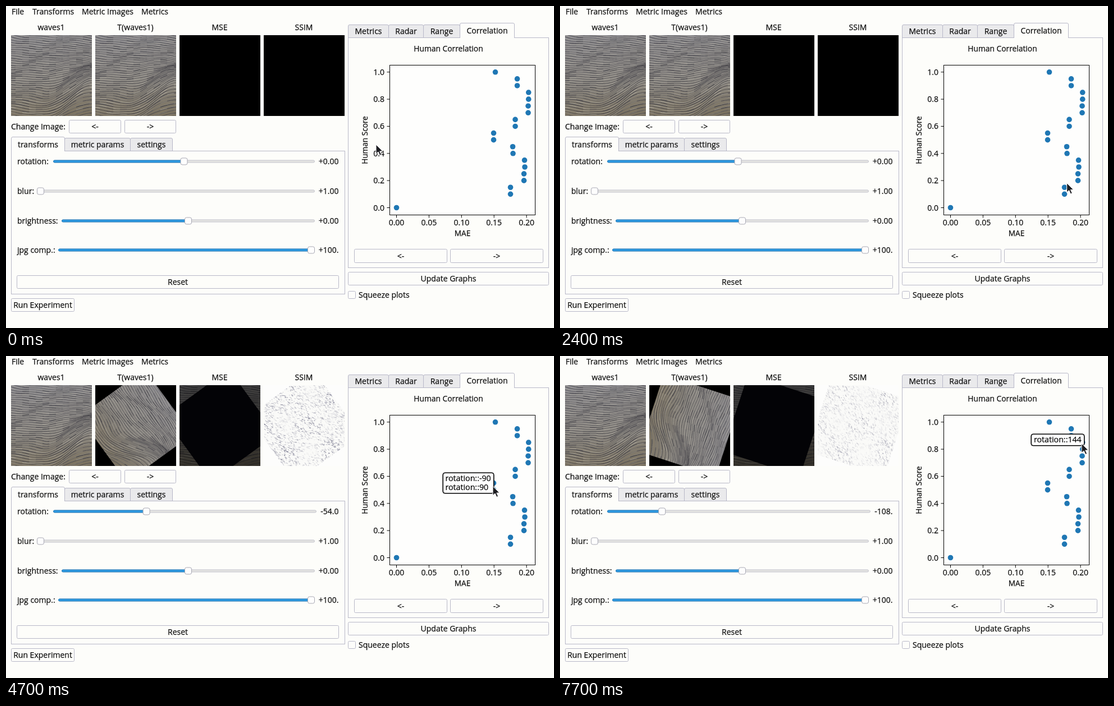
An HTML page with a canvas that plays this animation: 976 by 574 pixels, repeating every 8000 ms.

```html
<!DOCTYPE html>
<html lang="en">
<head>
<meta charset="utf-8">
<title>Image metric explorer</title>
<style>
  html, body { margin: 0; width: 100%; height: 100%; overflow: hidden; background: #fdfdfa; }
  body { position: relative; font: 14px "Open Sans", "Noto Sans", sans-serif; color: #111; }
  svg, canvas, #tip { position: absolute; }
  #ui { left: 0; top: 0; }
  #ui text { fill: #111; stroke: #111; stroke-width: .25px; }
  canvas { left: 9px; top: 52px; }
  #tip {
    box-sizing: border-box; padding: 1px 4px 2px; white-space: pre; font-size: 14.2px; line-height: 16px;
    border: 1px solid #000; border-radius: 4px; box-shadow: 0 0 0 .6px #000; background: #fff;
    color: #000; -webkit-text-stroke: .2px #000;
  }
  #cursor { left: 0; top: 0; overflow: visible; }
</style>
</head>
<body>
<svg id="ui" width="976" height="574"></svg>
<canvas id="views" width="594" height="144"></canvas>
<div id="tip"></div>
<svg id="cursor" width="14" height="21">
  <path d="M0 0V16.5L4 13L6.8 19.4L9.6 18.2L6.8 12H12Z" fill="#1e1e22" stroke="#fff" stroke-width="1"/>
</svg>
<script>
const $ = id => document.getElementById(id);
const ui = $('ui'), tip = $('tip'), cursor = $('cursor');
const BORDER = '#b8b8c8', PAPER = '#fdfdfa', BLUE = '#1f77b4';

function el(tag, attrs, text) {
  const node = document.createElementNS('http://www.w3.org/2000/svg', tag);
  for (const k in attrs) node.setAttribute(k, attrs[k]);
  if (text !== undefined) node.textContent = text;
  return ui.appendChild(node);
}
const label = (x, y, text, anchor = 'start', size = 14) =>
  el('text', { x, y, 'text-anchor': anchor, 'font-size': size }, text);
const mid = (x, y, text, size) => label(x, y, text, 'middle', size);
const box = (x, y, width, height, rx = 2, fill = PAPER, stroke = BORDER) =>
  el('rect', { x: x + .5, y: y + .5, width, height, rx, fill, stroke });
const line = (x1, y1, x2, y2) => el('line', { x1, y1, x2, y2, stroke: '#000' });

function button(x, y, w, h, text) {
  box(x, y, w, h);
  mid(x + w / 2 + .5, y + h / 2 + 5.5, text);
}
function tab(x, y, w, bottom, text, active) {
  const end = bottom + (active ? 1 : 0);
  el('path', {
    d: `M${x + .5} ${end}V${y + 3}q0 -2.5 2.5 -2.5h${w - 5}q2.5 0 2.5 2.5V${end}`,
    fill: active ? PAPER : '#eaeaec', stroke: BORDER
  });
  mid(x + w / 2 + .5, active ? y + 18.5 : y + 17, text);
}
function slider(name, x, y) {
  label(20, y + 5, name);
  const rail = box(x, y - 2.5, 10, 4, 2, '#e4e4e2', '#c3c3cc');
  const fill = box(x, y - 2.5, 10, 4, 2, '#2f9be2', '#1f78b8');
  const knob = box(0, y - 6.5, 12, 12, 3, '#fdfdfd', '#a9a9b4');
  const value = label(592.5, y + 5, '', 'end');
  return (part, end, text) => {
    const at = x + 6.5 + (end - x - 13) * part;
    rail.setAttribute('width', end - x - 1);
    fill.setAttribute('width', Math.max(0, at - x - 4));
    fill.setAttribute('visibility', part ? 'visible' : 'hidden');
    knob.setAttribute('x', at - 6);
    value.textContent = text;
  };
}

// Menu, image titles, left side
[[10, 'File'], [47, 'Transforms'], [135, 'Metric Images'], [241, 'Metrics']].forEach(([x, s]) => label(x, 15, s));
['waves1', 'T(waves1)', 'MSE', 'SSIM'].forEach((s, i) => mid(80.5 + 150 * i, 43, s));
label(9, 219.5, 'Change Image:');
button(112, 203, 92, 23, '<-');
button(211, 203, 91, 23, '->');
box(9, 258, 594, 255, 0);
tab(104, 235, 117, 258, 'metric params');
tab(221, 235, 75, 258, 'settings');
tab(9, 233, 95, 258, 'transforms', true);
const setRotation = slider('rotation:', 84, 277);
slider('blur:', 55, 330)(0, 550, '+1.00');
slider('brightness:', 99, 383)(.5, 550, '+0.00');
slider('jpg comp.:', 93, 435)(1, 550, '+100.');
button(19, 480, 573, 23, 'Reset');
button(9, 521, 112, 23, 'Run Experiment');

// Right side
box(609, 56, 357, 410, 0);
tab(609, 33, 72, 56, 'Metrics');
tab(681, 33, 62, 56, 'Radar');
tab(743, 33, 65, 56, 'Range');
tab(808, 30, 97, 56, 'Correlation', true);
button(620, 433, 165, 24, '<-');
button(791, 433, 165, 24, '->');
button(609, 474, 357, 23, 'Update Graphs');
box(609, 508, 13, 13);
label(628, 520, 'Squeeze plots');

// Scatter plot
const scoreY = s => 359.5 - 241.7 * s;
mid(788, 81, 'Human Correlation', 13.8);
box(683, 105, 259, 267, 0, '#fefefd', '#000');
for (let i = 0; i < 5; i++) {
  const x = 695.5 + 57.9 * i;
  line(x, 372.5, x, 377.5);
  mid(x, 391, (i * .05).toFixed(2));
}
for (let i = 0; i < 6; i++) {
  const y = scoreY(i / 5);
  line(678.5, y, 683.5, y);
  label(674, y + 5, (i / 5).toFixed(1), 'end');
}
mid(813, 410, 'MAE', 13.6);
mid(0, 0, 'Human Score', 13.6).setAttribute('transform', 'translate(644 239) rotate(-90)');
const dots = [[695.5, 0], [871.5, 1]];
[898.5, 922.5, 924, 903, 868.5, 907, 930, 930.7, 910.5].forEach((x, i) => {
  dots.push([x, .1 * (i + 1)], [x - (i % 4 > 1 && i < 4 ? .5 : 0), .1 * (i + 1) + .05]);
});
dots.forEach(([x, s]) => el('circle', { cx: x, cy: scoreY(s), r: 4.8, fill: BLUE }));

// Image views
const SIZE = 144;
const ctx = $('views').getContext('2d');

function random(seed) {
  return () => (seed = (seed * 16807) % 2147483647) / 2147483647;
}
function rippleY(c, x) {
  const u = x / SIZE, v = c / SIZE;
  const k = Math.min(1, Math.max(0, (u - .4) / .6));
  return c + 14 * u * (1 - v) + 1.2 * Math.sin(u * 14 + v * 19) + 3 * Math.sin(u * 5 + v * 6)
    - 42 * k * k * (3 - 2 * k) * Math.exp(-(((v - .78) / .4) ** 2));
}
function makeWaves() {
  const c = document.createElement('canvas');
  c.width = c.height = SIZE;
  const g = c.getContext('2d');
  const rnd = random(97);
  const shade = g.createLinearGradient(50, 0, 60, SIZE);
  shade.addColorStop(0, '#8d8c90');
  shade.addColorStop(.6, '#89857f');
  shade.addColorStop(1, '#7c7361');
  g.fillStyle = shade;
  g.fillRect(0, 0, SIZE, SIZE);
  // Uneven ripples, drawn in short pieces of changing weight
  const ripples = (shift, color, width) => {
    for (let y = -40; y < 210; y += 3.4 + rnd() * 1.2) {
      for (let x = -4; x < SIZE; x += 12) {
        g.strokeStyle = `rgba(${color},${.3 + rnd() * .5})`;
        g.lineWidth = width * (.7 + rnd() * .6);
        g.beginPath();
        for (let dx = 0; dx <= 12; dx += 3) g.lineTo(x + dx, rippleY(y, x + dx) + shift);
        g.stroke();
      }
    }
  };
  ripples(1.8, '180,176,166', 1.1);
  ripples(0, '58,57,64', 1.4);
  return c;
}
const waves = makeWaves();

// Runs paint() in view i, clipped to it, with the middle as zero
function view(i, paint) {
  ctx.save();
  ctx.beginPath();
  ctx.rect(150 * i, 0, SIZE, SIZE);
  ctx.clip();
  ctx.translate(150 * i + SIZE / 2, SIZE / 2);
  paint();
  ctx.restore();
}
const H = SIZE / 2;
const fillSquare = color => { ctx.fillStyle = color; ctx.fillRect(-H, -H, SIZE, SIZE); };
const drawWaves = () => ctx.drawImage(waves, -H, -H);

function speckle(angle, strength) {
  const rnd = random(4711);
  for (let i = 0; i < 2200; i++) {
    const x = (rnd() - .5) * SIZE, y = (rnd() - .5) * SIZE;
    const a = angle * .5 + (rnd() - .5) * 1.2, len = 1 + rnd() * 4;
    const patch = .6 + .4 * Math.sin(x / 13 + 1) * Math.sin(y / 17 + 2);
    ctx.lineWidth = .7 + rnd() * .5;
    ctx.strokeStyle = `rgba(105,105,130,${strength * patch * rnd()})`;
    ctx.beginPath();
    ctx.moveTo(x, y);
    ctx.lineTo(x + len * Math.cos(a), y + len * Math.sin(a));
    ctx.stroke();
  }
}
const speckleStrength = { '-54': .95, '-90': .35, '-108': .55 };

function drawViews(deg) {
  const angle = -deg * Math.PI / 180;
  ctx.clearRect(0, 0, 594, SIZE);
  view(0, drawWaves);
  view(1, () => { fillSquare('#000'); ctx.rotate(angle); drawWaves(); });
  view(2, () => {
    if (!deg) return fillSquare('#000');
    drawWaves();
    fillSquare('rgba(0,0,0,.58)');
    ctx.rotate(angle);
    fillSquare('#030306');
  });
  view(3, () => {
    if (!deg) return fillSquare('#000');
    fillSquare('#fdfdfc');
    ctx.rotate(angle);
    ctx.beginPath();
    ctx.rect(-H, -H, SIZE, SIZE);
    ctx.clip();
    ctx.rotate(-angle);
    fillSquare('#fafaf8');
    speckle(angle, speckleStrength[deg]);
  });
}

// Timeline
const LOOP = 8000, STEP = 100;
const path = [
  [0, 659, 247], [900, 729, 350], [1100, 795, 357], [1400, 889, 340], [1600, 894, 336],
  [1700, 894, 336], [2000, 895, 328], [2200, 895, 328], [2700, 914, 297], [3100, 922, 281],
  [3900, 922, 281], [4700, 867, 232], [5500, 867, 232], [5800, 903, 211], [6900, 903, 211],
  [7000, 904, 211], [7700, 929, 156], [8000, 929, 156]
];
const turns = [[0, 0, '+0.00'], [3600, -54, '-54.0'], [5400, -90, '-90.0'], [6400, -108, '-108.']];
const tips = [
  [1800, 2300, 898.5, .1, [-18, 18]], [2800, 4000, 924, .3, [-54, 54]], [4100, 4400, 903, .4, [-72, 72]],
  [4600, 5600, 868.5, .5, [-90, 90]], [5700, 7100, 907, .6, [-108]], [7500, LOOP, 930, .85, [144]]
];

function placeCursor(t) {
  const i = path.findIndex(p => p[0] > t);
  const [t0, x0, y0] = path[i - 1], [t1, x1, y1] = path[i];
  const k = (t - t0) / (t1 - t0);
  cursor.style.transform = `translate(${x0 + (x1 - x0) * k}px, ${y0 + (y1 - y0) * k}px)`;
}
function placeTip(t) {
  const now = tips.find(p => t >= p[0] && t < p[1]);
  tip.style.display = now ? 'block' : 'none';
  if (!now) return;
  const [, , x, score, values] = now;
  tip.textContent = values.map(v => 'rotation::' + v).join('\n');
  tip.style.left = x - 91 + 'px';
  tip.style.top = scoreY(score) + 6 - 16 * values.length - 5 + 'px';
}

let lastT = -1, lastDeg = null;
function frame(ms) {
  const t = Math.floor((ms % LOOP) / STEP) * STEP;
  if (t === lastT) return;
  lastT = t;
  placeCursor(t);
  placeTip(t);
  const [, deg, text] = turns.filter(p => p[0] <= t).pop();
  if (deg === lastDeg) return;
  lastDeg = deg;
  setRotation((deg + 180) / 360, deg ? 553 : 550, text);
  drawViews(deg);
}
const start = performance.now();
function tick(now) {
  frame(Math.max(0, now - start));
  requestAnimationFrame(tick);
}
frame(0);
requestAnimationFrame(tick);
</script>
</body>
</html>
```
